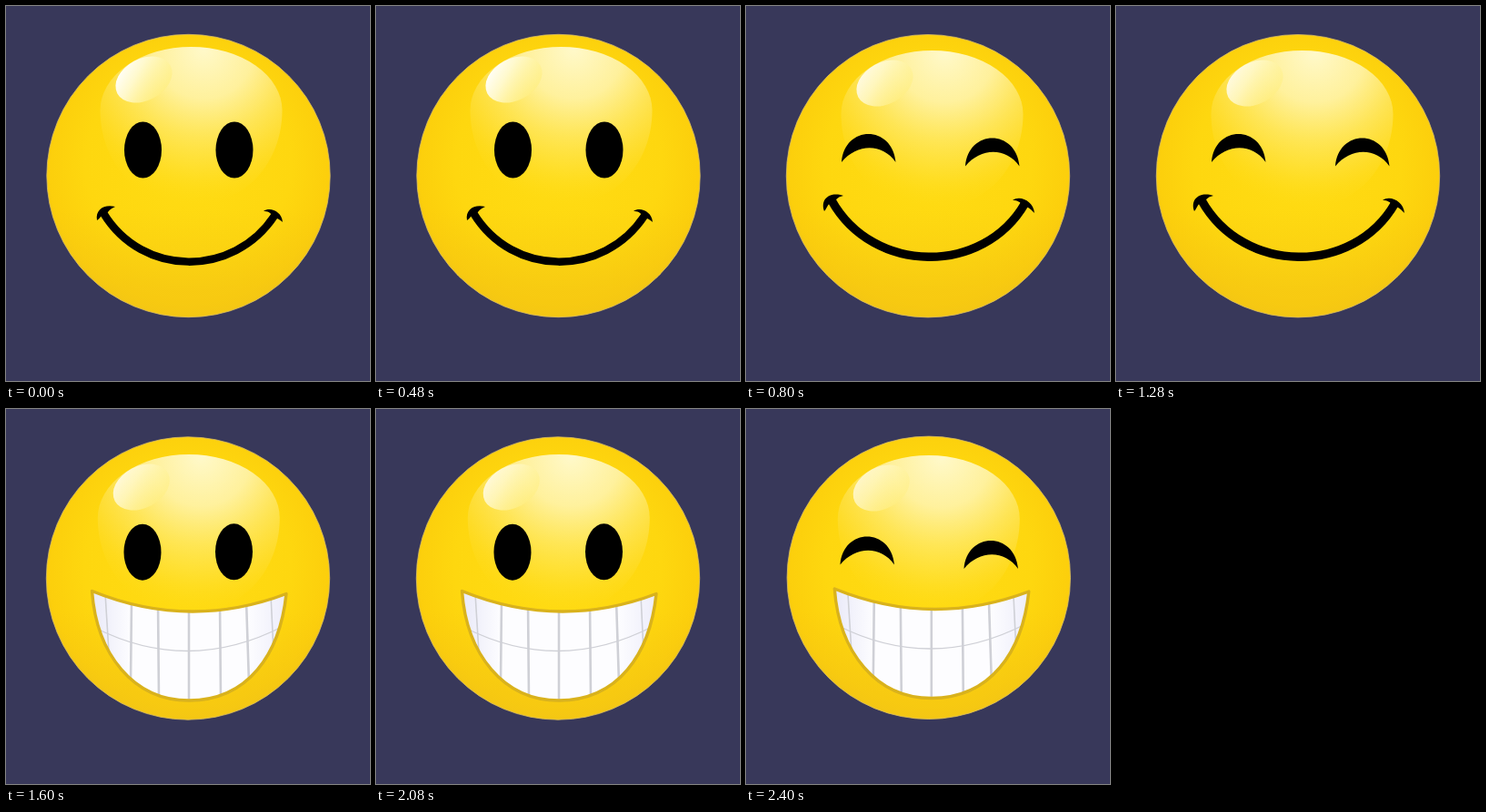
These frames come from a looping animation (400 px wide and 413 px high, 3200 ms). An HTML page:

```html
<!DOCTYPE html>
<html lang="en">
<head>
<meta charset="utf-8">
<title>Smiley moods</title>
<style>
  html, body { margin: 0; width: 100%; height: 100%; overflow: hidden; background: #38385a; }
  svg { display: block; width: 100%; height: 100%; }
</style>
</head>
<body>
<svg viewBox="0 0 400 413">
  <defs>
    <radialGradient id="skin" cx=".5" cy=".46" r=".56">
      <stop offset="0" stop-color="#ffdc14"/>
      <stop offset=".65" stop-color="#fed70f"/>
      <stop offset=".88" stop-color="#fccf0c"/>
      <stop offset="1" stop-color="#f4c712"/>
    </radialGradient>
    <linearGradient id="shade" x2="0" y2="1">
      <stop offset=".62" stop-color="#f2c416" stop-opacity="0"/>
      <stop offset=".9" stop-color="#f2c416" stop-opacity=".5"/>
    </linearGradient>
    <radialGradient id="shine" gradientUnits="userSpaceOnUse" cx="14" cy="2" r="172">
      <stop offset="0" stop-color="#fffad0" stop-opacity=".97"/>
      <stop offset=".32" stop-color="#fff8c4" stop-opacity=".78"/>
      <stop offset=".56" stop-color="#fff6b4" stop-opacity=".42"/>
      <stop offset=".78" stop-color="#fff0a0" stop-opacity=".16"/>
      <stop offset="1" stop-color="#ffe020" stop-opacity="0"/>
    </radialGradient>
    <linearGradient id="spot" x1=".1" y1=".1" x2=".85" y2=".9">
      <stop offset="0" stop-color="#fff"/>
      <stop offset=".35" stop-color="#fffbd8" stop-opacity=".9"/>
      <stop offset="1" stop-color="#ffee78" stop-opacity=".55"/>
    </linearGradient>
    <linearGradient id="enamel">
      <stop offset="0" stop-color="#e9e9f8"/>
      <stop offset=".2" stop-color="#fdfdff"/>
      <stop offset=".8" stop-color="#fdfdff"/>
      <stop offset="1" stop-color="#ededfa"/>
    </linearGradient>
    <path id="lips" d="M94.500 200.500Q201 244 308 203.500C301 270 266 321 201 321C140 321 99.500 270 94.500 200.500Z"/>
    <clipPath id="inside"><use href="#lips"/></clipPath>
    <g id="grin">
      <use href="#lips" fill="url(#enamel)"/>
      <g clip-path="url(#inside)" fill="none" stroke="#cfd0d6">
        <path stroke-width="2.6" d="M138 210L137 302M167 212L168 320M201 215V322M235 212L236 320M264 210L267 302"/>
        <path stroke-width="1.6" d="M109 203L113 268M291 204L294 268"/>
        <path stroke-width="1.4" d="M98 241Q201 293 305 239"/>
      </g>
      <use href="#lips" fill="none" stroke="#d9b21c" stroke-width="3.4" stroke-linejoin="round"/>
    </g>
    <path id="lid" d="M-30 31C-27-10.500 26-10.500 29.500 31C15 10-13 10-30 31Z"/>
    <ellipse id="eye" rx="20.500" ry="31"/>
    <g id="smile">
      <path d="M107 228C150 299 250 299 295 231" fill="none" stroke="#000" stroke-width="8.500"/>
      <path d="M100 236C98 224 108 218 120 221C115 223 112 226 110 230L105 231C103 233 102 235 100 236Z"/>
      <path d="M283 226C290 221 303 226 304 238C302 236 300 235 298 234L292 231C291 227 287 226 283 226Z"/>
    </g>
    <g id="beam">
      <path d="M94 214C140 296.500 261 296.500 306.500 217.500" fill="none" stroke="#000" stroke-width="9.500"/>
      <path d="M86 226C81 212 93 204 107 209C102 210 99 212 98 216L92 217C89 220 88 224 86 226Z"/>
      <path d="M293 214C301 208 316 215 317 228C314 225 312 223 310 222L303 219C302 216 298 214 293 214Z"/>
    </g>
  </defs>
  <rect width="400" height="413" fill="#38385a"/>
  <g id="head">
    <circle r="155.700" fill="url(#skin)"/>
    <circle r="155.700" fill="url(#shade)" stroke="#d8bd62" stroke-width=".8"/>
  </g>
  <g id="gloss">
    <path d="M-100 70A100 70 0 0 1 100 70C100 125 62 174 0 174S-100 125-100 70Z" fill="url(#shine)"/>
    <ellipse id="glint" cx="-52" cy="36" rx="33" ry="23" transform="rotate(-28 -52 36)" fill="url(#spot)"/>
  </g>
  <use id="left"/>
  <use id="right"/>
  <use id="mouth"/>
</svg>
<script>
const HOLD = 800;
const el = id => document.getElementById(id);

// Each pose: positions of head, gloss, eyes and mouth
const poses = [
  { head: [200.5, 187], gloss: [203.5, 45], glint: 1, eye: 'eye', left: [150.5, 158.5], right: [251, 158.5], mouth: 'smile', at: [0, 0] },
  { head: [200, 187.2], gloss: [204.5, 49], glint: .85, eye: 'lid', left: [135, 141], right: [271, 145.5], mouth: 'beam', at: [0, 0] },
  { head: [200, 186.5], gloss: [200.8, 50], glint: .8, eye: 'eye', left: [150, 157.7], right: [250.5, 157.3], mouth: 'grin', at: [0, 0] },
  { head: [200.8, 185.8], gloss: [200.8, 51], glint: .7, eye: 'lid', left: [133.5, 140.5], right: [269.5, 145], mouth: 'grin', at: [2.8, -2.5] }
];

function move(id, [x, y], shape) {
  el(id).setAttribute('transform', `translate(${x} ${y})`);
  if (shape) el(id).setAttribute('href', '#' + shape);
}

function draw(time) {
  const p = poses[Math.floor(time / HOLD) % poses.length];
  move('head', p.head);
  move('gloss', p.gloss);
  el('glint').setAttribute('opacity', p.glint);
  move('left', p.left, p.eye);
  move('right', p.right, p.eye);
  move('mouth', p.at, p.mouth);
}

const start = performance.now();
function tick() {
  draw(performance.now() - start);
  requestAnimationFrame(tick);
}
tick();
</script>
</body>
</html>
```
